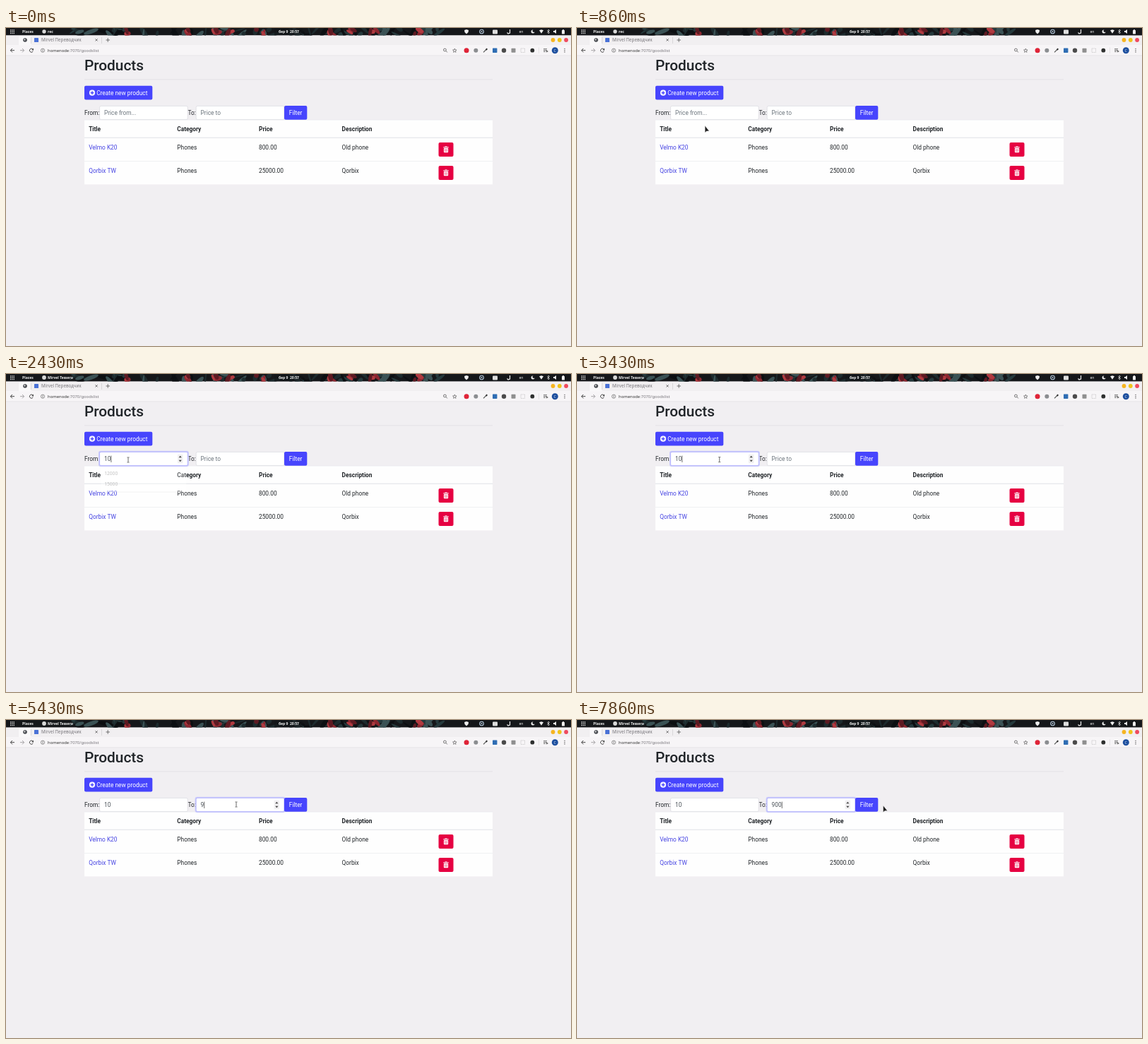
Animation of 800 by 450 pixels, one loop 8000 ms. Source, as an HTML page with a canvas:

```html
<!DOCTYPE html>
<html lang="en">
<head>
<meta charset="utf-8">
<title>Products</title>
<style>
html, body { margin: 0; width: 100%; height: 100%; overflow: hidden; background: #f1eff2; }
canvas { display: block; width: 800px; height: 450px; }
</style>
</head>
<body>
<canvas id="stage"></canvas>
<script>
const LOOP = 8000, STEP = 1000 / 7;
const BODY = 'Roboto, sans-serif', UI = '"Noto Sans", sans-serif';
const INK = '#212529', BLUE = '#4745fd', MUTED = '#6c757d', RED = '#e60042';
const canvas = document.getElementById('stage');
const c = canvas.getContext('2d');
const dpr = window.devicePixelRatio || 1;
canvas.width = 800 * dpr;
canvas.height = 450 * dpr;

const clamp = v => Math.max(0, Math.min(1, v));
const ease = v => v * v * (3 - 2 * v);

function rect(x, y, w, h, color) {
  c.fillStyle = color;
  c.fillRect(x, y, w, h);
}

function box(x, y, w, h, r, fill, stroke, lw = 0.6) {
  c.beginPath();
  c.roundRect(x, y, w, h, r);
  if (fill) { c.fillStyle = fill; c.fill(); }
  if (stroke) { c.strokeStyle = stroke; c.lineWidth = lw; c.stroke(); }
}

function disc(x, y, r, fill, stroke, lw = 0.8) {
  c.beginPath();
  c.arc(x, y, r, 0, 7);
  if (fill) { c.fillStyle = fill; c.fill(); }
  if (stroke) { c.strokeStyle = stroke; c.lineWidth = lw; c.stroke(); }
}

function line(color, lw, ...p) {
  c.beginPath();
  for (let i = 0; i < p.length; i += 2) c.lineTo(p[i], p[i + 1]);
  c.strokeStyle = color;
  c.lineWidth = lw;
  c.stroke();
}

function poly(color, ...p) {
  c.beginPath();
  for (let i = 0; i < p.length; i += 2) c.lineTo(p[i], p[i + 1]);
  c.closePath();
  c.fillStyle = color;
  c.fill();
}

function text(s, x, y, size = 8.33, color = INK, weight = 400, family = BODY) {
  c.font = `${weight} ${size}px ${family}`;
  c.fillStyle = color;
  c.fillText(s, x, y);
  return c.measureText(s).width;
}

// Desktop strip: dark floral backdrop with panel items
function drawPanel(t) {
  let seed = 11;
  const rnd = () => (seed = (seed * 16807) % 2147483647) / 2147483647;
  c.save();
  c.beginPath();
  c.rect(0, 0, 800, 10.5);
  c.clip();
  rect(0, 0, 800, 10.5, '#15171a');
  for (let i = 0; i < 80; i++) {
    const x = 95 + rnd() * 545, tone = ['#25393c', '#3b5255', '#1d2b2e', '#0c0f12'][i % 4];
    c.beginPath();
    c.ellipse(x, rnd() * 11, 3 + rnd() * 9, 1 + rnd() * 2.5, rnd() * 3, 0, 7);
    c.fillStyle = tone;
    c.fill();
  }
  for (const x of [176, 256, 300, 318, 358, 460, 488, 520, 582]) {
    for (let j = 0; j < 3; j++) {
      c.beginPath();
      c.ellipse(x + rnd() * 14 - 7, 2 + rnd() * 7, 3 + rnd() * 5, 1.5 + rnd() * 2, rnd() * 3, 0, 7);
      c.fillStyle = ['#8c2730', '#b03a40', '#5d1a22'][j];
      c.fill();
    }
  }
  rect(380, 0, 40, 10.5, 'rgba(18,20,23,.7)');
  c.restore();

  for (let i = 0; i < 9; i++) rect(6 + i % 3 * 2.3, 2.3 + (i / 3 | 0) * 2.3, 1.3, 1.3, '#eee');
  const label = (s, x) => text(s, x, 6.8, 5, '#f4f4f4', 700, UI);
  label('Places', 23);
  if (t < 1280) {
    disc(54, 5, 2.7, '#d9d9d9');
    label('rec', 59);
  } else {
    disc(54, 5, 2.9, '#d9d9d9');
    label('Mirvel Tessera', 59);
  }
  label('бер 9  20:57', 386);

  const w = '#eeeeee';
  poly(w, 649, 3, 652, 2, 655, 3, 654.5, 6, 652, 8.5, 649.5, 6);
  disc(673.5, 5, 2.8, null, '#b8cde0', 1.1);
  disc(673.5, 5, 1, '#b8cde0');
  box(689, 2.5, 7, 6, 1, '#ddd');
  line(w, 1.2, 713.5, 2, 713.5, 7, 711, 8, 709.5, 6.5);
  text('en', 726.5, 6.8, 5, w, 400, UI);
  disc(746, 5, 2.5, w);
  disc(747.5, 4, 2.1, '#15171a');
  poly(w, 755, 3.3, 758, 2.2, 761, 3.3, 758, 7.8);
  line(w, 0.7, 766.3, 3.5, 769.5, 6.5, 768, 8, 768, 2, 769.5, 3.5, 766.3, 6.5);
  poly(w, 775, 4, 776.5, 4, 779, 2, 779, 8, 776.5, 6, 775, 6);
  box(787, 3, 4, 5.5, 0.6, w);
  rect(788, 2.2, 2, 1, w);
}

function drawBrowser() {
  rect(0, 10.5, 800, 13.5, '#f1eff1');
  rect(0, 24, 800, 15, '#f7f5f7');
  box(18, 11.5, 17.5, 13, [2, 2, 0, 0], '#f9f8f9');
  rect(35.3, 13, 0.6, 9, '#c9c7ca');
  rect(135, 13, 0.6, 9, '#c9c7ca');
  rect(0, 38.6, 800, 0.6, '#dfdde0');

  disc(27, 17, 2.8, '#45484d');
  poly('#e8e8e8', 25.2, 16, 27, 15.2, 27.6, 16.8, 26.4, 18);
  box(40, 14, 6, 6, 0.6, '#4a72d6');
  text('Mirvel Переводчик', 50, 19.2, 6.2, '#77757a', 400, UI);
  line('#555', 0.8, 126.5, 15.3, 129.7, 18.5);
  line('#555', 0.8, 129.7, 15.3, 126.5, 18.5);
  line('#555', 0.8, 141.5, 17, 147, 17);
  line('#555', 0.8, 144.2, 14.2, 144.2, 19.8);
  ['#f6b420', '#f0c419', '#ef4b5f'].forEach((f, i) => disc(774.5 + i * 9.3, 17, 2.9, f));

  line('#444', 1, 12, 31.7, 6.5, 31.7);
  line('#444', 1, 9, 29, 6.3, 31.7, 9, 34.4);
  line('#a5a3a6', 1, 20, 31.7, 25.5, 31.7);
  line('#a5a3a6', 1, 23, 29, 25.7, 31.7, 23, 34.4);
  c.beginPath();
  c.arc(36, 31.7, 2.6, 0.5, 5.6);
  c.strokeStyle = '#444';
  c.lineWidth = 1;
  c.stroke();
  poly('#444', 39, 28.5, 39, 31.4, 36.2, 31.4);
  disc(52, 31.7, 2.6, null, '#666', 0.7);
  rect(51.6, 31.2, 0.8, 2, '#666');
  rect(51.6, 30, 0.8, 0.8, '#666');
  const host = text('homenode', 59, 33.8, 5.9, '#333', 400, UI);
  text(':7070/goodslist', 59 + host, 33.8, 5.9, '#77757a', 400, UI);

  disc(621.4, 31, 1.9, null, '#555', 0.8);
  line('#555', 0.9, 622.8, 32.4, 624.8, 34.4);
  c.beginPath();
  for (let i = 0; i < 10; i++) {
    const a = i * Math.PI / 5 - Math.PI / 2, r = i % 2 ? 1.3 : 2.9;
    c.lineTo(635.3 + r * Math.cos(a), 32 + r * Math.sin(a));
  }
  c.closePath();
  c.strokeStyle = '#555';
  c.lineWidth = 0.7;
  c.stroke();
  disc(652, 31.7, 3.5, '#df2438');
  disc(665.3, 31.7, 3, '#8b8d90');
  line('#555', 1.2, 676, 34.3, 680, 30.3);
  line('#333', 2, 679.5, 31, 681.3, 29.2);
  box(689, 28.5, 6.4, 6.4, 0.6, '#2f6db3');
  disc(705, 31.7, 3.2, '#4b4b4b');
  box(715.5, 28.7, 6, 6, 0.8, '#8f8f8f');
  c.setLineDash([1, 0.8]);
  box(729, 29, 5.5, 5.5, 0, null, '#aaa');
  c.setLineDash([]);
  disc(745.3, 31.7, 2.9, '#2e302f');
  rect(754, 27.5, 0.5, 8.5, '#d2d0d3');
  for (let i = 0; i < 3; i++) rect(761, 29.3 + i * 1.8, i < 2 ? 5 : 3, 0.8, '#555');
  poly('#555', 765, 31.8, 768, 33, 765, 34.5);
  disc(777.3, 31.7, 4.5, '#1d4f9e');
  text('C', 775.5, 33.7, 5.3, '#dce6f5', 400, UI);
  for (let i = 0; i < 3; i++) disc(791, 29.4 + i * 2.3, 0.7, '#555');
}

function trash(x, y) {
  box(x, y, 21, 19.8, 2, RED);
  const m = x + 10.5;
  rect(m - 3.7, y + 6.2, 7.4, 1.1, '#fff');
  rect(m - 1.4, y + 5.3, 2.8, 1, '#fff');
  box(m - 3.1, y + 7.8, 6.2, 6.4, 0.8, '#fff');
  for (let i = -1; i < 2; i++) rect(m + i * 1.6 - 0.25, y + 8.8, 0.5, 4.3, RED);
}

function drawInput(x, value, hint, focus, spin, caret) {
  if (focus > 0) {
    c.globalAlpha = focus;
    box(x - 1.4, 108.8, 127.8, 22.2, 3, '#c9c9fb');
    c.globalAlpha = 1;
  }
  box(x + 0.2, 110.4, 124.6, 19.2, 2, '#fff', focus > 0.5 ? '#a2a1fb' : '#d3d6dc');
  const w = text(value || hint, x + 6.6, 123.3, 8.33, value ? '#495057' : MUTED);
  if (caret) rect(x + 6.8 + (value ? w : 0), 115.6, 0.7, 9.4, '#333');
  if (spin) {
    box(x + 110.6, 113.8, 7.4, 12.4, 0.8, '#f0eff1');
    poly('#444', x + 112.2, 118.2, x + 114.3, 115.8, x + 116.4, 118.2);
    poly('#444', x + 112.2, 121.8, x + 114.3, 124.2, x + 116.4, 121.8);
  }
}

function drawMenu(x, items, alpha) {
  if (alpha <= 0) return;
  const h = items.length * 15 + 6, shift = (1 - alpha) * 2.9;
  c.save();
  c.globalAlpha = alpha;
  if (alpha === 1) {
    c.shadowColor = 'rgba(0,0,0,.35)';
    c.shadowBlur = 3 * dpr;
    c.shadowOffsetY = dpr;
  }
  rect(x + shift, 131, 125 - 2 * shift, h, '#fff');
  c.shadowColor = 'transparent';
  rect(x + shift, 130.7 + h, 125 - 2 * shift, 0.6, '#bbb');
  items.forEach((s, i) => text(s, x + 4.7 + shift, 143.4 + i * 15, 6.7, '#333', 400, UI));
  c.restore();
}

// Pointer path: time, x, y
const PATH = [
  [140, 262, 283], [290, 240, 255], [430, 214, 206], [570, 198.5, 173],
  [860, 181, 138], [1000, 175, 122], [1140, 173, 121.5],
  [3290, 173, 121.5], [3790, 326, 119.5], [7140, 326, 119.5],
  [7430, 375, 118], [7570, 402, 119], [7714, 418, 120], [7855, 433.5, 121]
];

function pointer(t) {
  if (t < 138) return null;
  let i = 0;
  while (i < PATH.length - 2 && t > PATH[i + 1][0]) i++;
  const [t0, x0, y0] = PATH[i], [t1, x1, y1] = PATH[i + 1];
  let k = clamp((t - t0) / (t1 - t0));
  if (t0 === 3290) k = ease(k);
  return { x: x0 + (x1 - x0) * k, y: y0 + (y1 - y0) * k };
}

const inside = (p, x0, x1, y0, y1) => p && p.x >= x0 && p.x <= x1 && p.y >= y0 && p.y <= y1;

function drawPointer(p, overField, overButton) {
  if (!p) return;
  const { x, y } = p;
  if (overField) {
    line('#444', 0.8, x, y - 3.2, x, y + 3.2);
    line('#444', 0.7, x - 1.6, y - 3.5, x + 1.6, y - 3.5);
    line('#444', 0.7, x - 1.6, y + 3.5, x + 1.6, y + 3.5);
  } else if (overButton) {
    box(x - 2.4, y + 3.4, 6.4, 5.4, 1.6, '#222', '#fff', 0.5);
    box(x - 1, y, 2, 6.5, 1, '#222', '#fff', 0.5);
  } else {
    const tip = [x, y, x, y + 9.6, x + 2.3, y + 7.6, x + 6, y + 7.5];
    poly('#1c1c1c', ...tip);
    line('rgba(255,255,255,.8)', 0.5, ...tip, x, y);
  }
}

function drawPage(t) {
  const p = pointer(t), past = pointer(t - STEP);
  const onFrom = inside(p, 132.5, 257.5, 110, 130);
  const onTo = inside(p, 269, 394, 110, 130);
  const onFilter = inside(p, 394, 426, 110, 130);

  rect(0, 39.2, 800, 411, '#f1eff2');
  text('Products', 110.9, 60, 20.83, INK, 500);
  rect(111, 72.6, 578, 0.6, '#dad8db');
  box(111, 81.8, 96.3, 19.8, 2, BLUE);
  disc(122, 91.7, 4.1, '#fff');
  rect(119.6, 91, 4.8, 1.4, BLUE);
  rect(121.3, 89.3, 1.4, 4.8, BLUE);
  text('Create new product', 128.2, 94.8, 8.33, '#fff');

  rect(111, 130, 578, 91.3, '#fefefe');
  rect(111, 129.8, 578, 0.5, '#dee2e6');
  [[117.2, 'Title'], [242.3, 'Category'], [358, 'Price'], [475.6, 'Description']]
    .forEach(([x, s]) => text(s, x, 145.9, 8.33, INK, 700));
  rect(111, 154.7, 578, 1, '#dee2e6');
  const rows = [['Velmo K20', '800.00', 'Old phone'], ['Qorbix TW', '25000.00', 'Qorbix']];
  rows.forEach(([name, price, note], i) => {
    const y = 155.7 + i * 33;
    if (inside(past, 111, 689, y, y + 33)) rect(111, y, 578, 32.8, '#ebecec');
    if (i) rect(111, y - 0.3, 578, 0.5, '#dee2e6');
    text(name, 117.2, y + 16.2, 8.33, '#4442e2');
    text('Phones', 242.3, y + 16.2);
    text(price, 358, y + 16.2);
    text(note, 475.6, y + 16.2);
    trash(612.5, y + 6.4);
  });

  const from = t < 2138 ? '' : t < 2400 ? '1' : '10';
  const to = t < 4420 ? '' : t < 6200 ? '9' : t < 6640 ? '90' : '900';
  const fromFocus = t > 3850 ? clamp((4000 - t) / 150) : clamp((t - 1290) / 140);
  const toFocus = clamp((t - 3850) / 140);
  const off = [[1785, 2138], [2920, 3420], [4850, 5425], [5995, 6200], [7138, 7640]]
    .some(([a, b]) => t >= a && t < b);
  text('From:', 110.9, 123.3);
  text('To:', 257.5, 123.3);
  drawInput(132.4, from, 'Price from...', fromFocus, onFrom || (t > 1280 && t < 3850), t > 1280 && t < 3850 && !off);
  drawInput(269, to, 'Price to', toFocus, onTo || t > 3850, t > 3850 && !off);
  box(394, 110.1, 32.3, 19.6, 2, onFilter ? '#2421fb' : BLUE);
  text('Filter', 400.8, 123.3, 8.33, '#fff');

  drawMenu(132.4, ['12000', '15000'], t < 1280 ? 0 : t < 2420 ? 1 : t < 2560 ? 0.3 : 0);
  drawMenu(269, ['20000', '30000', '50000'], t > 3850 && t < 4420 ? 1 : 0);
  drawPointer(p, onFrom || onTo, onFilter);
}

function frame(now) {
  const t = Math.floor((now % LOOP + 6) / STEP) * STEP % LOOP;
  c.setTransform(dpr, 0, 0, dpr, 0, 0);
  drawPage(t);
  drawBrowser();
  drawPanel(t);
  requestAnimationFrame(frame);
}
requestAnimationFrame(frame);
</script>
</body>
</html>
```
